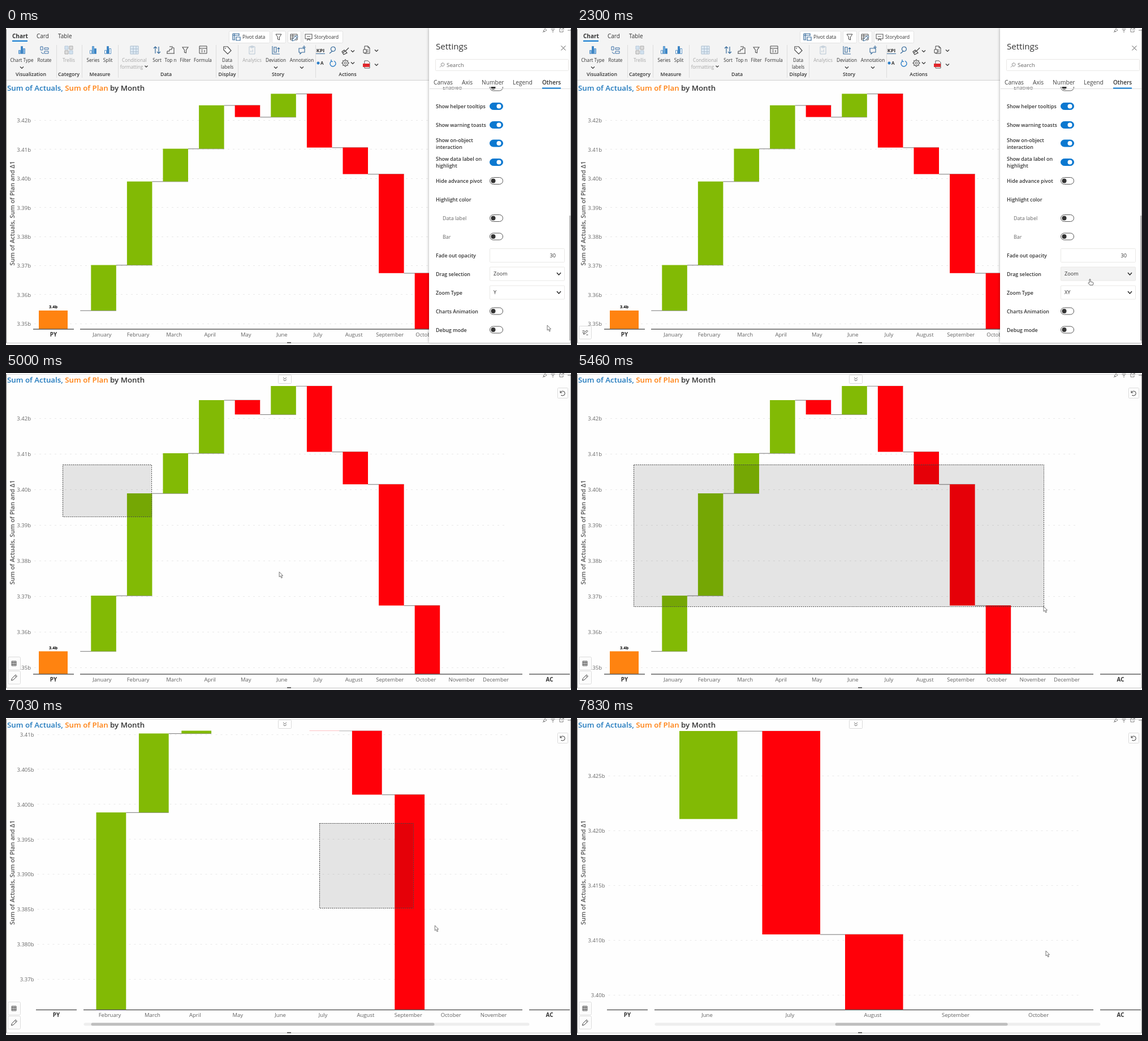
An HTML page with a canvas that plays this animation: 999x561 px, repeating every 8 s.

```html
<!DOCTYPE html>
<html lang="en">
<head>
<meta charset="utf-8">
<title>Chart zoom</title>
<style>
html, body { margin: 0; width: 100%; height: 100%; overflow: hidden; background: #fff }
canvas { display: block; width: 999px; height: 561px }
</style>
</head>
<body>
<canvas id="stage"></canvas>
<script>
const canvas = document.getElementById('stage'), c = canvas.getContext('2d');
const dpr = window.devicePixelRatio || 1;
canvas.width = 999 * dpr;
canvas.height = 561 * dpr;

const BLUE = '#0b78d0', INK = '#333', MUTED = '#666', LINE = '#e9e8e6';
const GREEN = '#82ba05', RED = '#ff0009', ORANGE = '#ff8310';
const MONTHS = ['January', 'February', 'March', 'April', 'May', 'June', 'July', 'August',
  'September', 'October', 'November', 'December'];
// Waterfall levels, in pixels of the unzoomed chart
const LEVELS = [492.5, 394, 213, 142, 48, 73.4, 23, 139.5, 197, 411.5, 560];

// top + scale * (level - 23) gives y; bars start at x0 with the given pitch
const VIEWS = {
  panel: { top: 116.4, scale: .817, base: 533, first: 0, last: 11, x0: 150.3, pitch: 63.6, label: 19.6,
    axis: 131, py: 48, titleY: 106, nameY: 328, tickY: 164, tickStep: 51.4, tickX: 44,
    ticks: ['3.42b', '3.41b', '3.40b', '3.39b', '3.38b', '3.37b', '3.36b', '3.35b'] },
  wide: { top: 23, scale: 1, base: 533, first: 0, last: 11, x0: 150.3, pitch: 63.6, label: 19.6,
    axis: 131, py: 48, titleY: 12, nameY: 282, tickY: 80.5, tickStep: 63, tickX: 44,
    ticks: ['3.42b', '3.41b', '3.40b', '3.39b', '3.38b', '3.37b', '3.36b', '3.35b'] },
  zoom1: { top: -206.8, scale: 1.968, base: 516.5, first: 1, last: 10, x0: 159.5, pitch: 75.4, label: 24,
    axis: 137, py: 53, titleY: 12, nameY: 273.5, tickY: 29.5, tickStep: 61.9, tickX: 49.5, thumb: [150, 758],
    ticks: ['3.41b', '3.405b', '3.400b', '3.395b', '3.390b', '3.385b', '3.380b', '3.37b'] },
  zoom2: { top: 23, scale: 3.09, base: 516.5, first: 5, last: 9, x0: 181, pitch: 146.5, label: 49,
    axis: 137, py: 53, titleY: 12, nameY: 273.5, tickY: 102.5, tickStep: 97, tickX: 49.5, thumb: [456, 762],
    ticks: ['3.425b', '3.420b', '3.415b', '3.410b', '3.40b'] }
};

// ---- drawing helpers ----
function text(s, x, y, size, color = INK, weight = 400, align = 'left') {
  c.font = `${weight} ${size}px "Open Sans", "Noto Sans", sans-serif`;
  c.fillStyle = color;
  c.textAlign = align;
  c.fillText(s, x, y + size * .357);
  return c.measureText(s).width;
}
const mid = (s, x, y, size, color, weight) => text(s, x, y, size, color, weight, 'center');

function rect(x, y, w, h, fill) {
  c.fillStyle = fill;
  c.fillRect(x, y, w, h);
}
function box(x, y, w, h, fill, stroke, r = 0) {
  c.beginPath();
  c.roundRect(x + .5, y + .5, w - 1, h - 1, r);
  if (fill) { c.fillStyle = fill; c.fill(); }
  if (stroke) { c.strokeStyle = stroke; c.lineWidth = 1; c.stroke(); }
}
function dot(x, y, r, fill) {
  c.beginPath();
  c.arc(x, y, r, 0, 7);
  c.fillStyle = fill;
  c.fill();
}
function icon(x, y, d, stroke = '#444', fill, width = 1) {
  const p = new Path2D(d);
  c.save();
  c.translate(x, y);
  c.lineWidth = width;
  if (fill) { c.fillStyle = fill; c.fill(p); }
  if (stroke) { c.strokeStyle = stroke; c.stroke(p); }
  c.restore();
}
const chevron = (x, y, s = 3) => icon(x, y, `M${-s} ${-s / 2}L0 ${s / 2}L${s} ${-s / 2}`, '#333', null, 1.2);
const FUNNEL = 'M-5-5H5L1.5 0V5L-1.5 4V0Z';
const LENS = 'M-1 2A4 4 0 1 1 4 0A4 4 0 0 1-1 2L-6 6';
const SMALL_LENS = 'M-1 1A2.8 2.8 0 1 1 1 2A2.8 2.8 0 0 1-1 1L-4 4';
const PENCIL = 'M-5 5L-4 1.5L2.5-5L5-2.5L-1.5 4ZM1-3.5L3.5-1';
const TABLE = 'M-6-5H6V5H-6ZM-6-2H6M-6 2H6M-2-5V5';
const LOOP = 'M-3-4A5 5 0 1 0 2-4.6M-3-7V-3.6H0';

// ---- chart ----
function chart(v) {
  const yOf = l => v.top + v.scale * (l - 23), w = v.pitch * .7;

  c.strokeStyle = '#e8e8e8';
  c.lineWidth = 1;
  c.setLineDash([3, 6]);
  v.ticks.forEach((s, i) => {
    const y = v.tickY + i * v.tickStep;
    c.beginPath();
    c.moveTo(v.tickX + 6, Math.round(y) - .5);
    c.lineTo(v.tickX + 842, Math.round(y) - .5);
    c.stroke();
    text(s, v.tickX, y, 9.5, MUTED, 400, 'right');
  });
  c.setLineDash([]);

  c.save();
  c.beginPath();
  c.rect(v.axis, 22.5, 913 - v.axis, v.base - 22.5);
  c.clip();
  for (let i = v.first; i <= Math.min(v.last, 9); i++) {
    const x = v.x0 + (i - v.first) * v.pitch, a = yOf(LEVELS[i]), b = yOf(LEVELS[i + 1]);
    if (i > v.first || !i) rect(x - v.pitch * .3, a - .3, v.pitch, 1, '#777');
    rect(x, Math.min(a, b), w, Math.abs(b - a), b < a ? GREEN : RED);
  }
  c.restore();

  if (!v.first) {
    const y = yOf(LEVELS[0]);
    rect(58, y, 51, v.base - y, ORANGE);
    mid('3.4b', 83.5, y - 6.5, 7.3, '#000', 700);
  }
  for (const [a, b] of [[v.py, v.py + 72], [v.axis, 913], [925, 997]]) rect(a, v.base - .7, b - a, 1.4, '#555');
  const ly = v.base + 9.5;
  for (let i = v.first; i <= v.last; i++)
    mid(MONTHS[i], Math.min(v.x0 + (i - v.first) * v.pitch + v.label, 866), ly, 9.5, '#606060');
  mid('PY', v.py + 36, ly, 9.8, INK, 700);
  mid('AC', 961, ly, 9.8, INK, 700);

  let x = 2;
  for (const [s, col] of [['Sum of Actuals, ', '#2079bd'], ['Sum of Plan ', '#ff7f0e'], ['by Month', INK]])
    x += text(s, x, v.titleY, 13.3, col, 600);
  c.save();
  c.translate(11, v.nameY);
  c.rotate(-Math.PI / 2);
  mid('Sum of Actuals, Sum of Plan and Δ1', 0, 0, 10.9, '#555', 600);
  c.restore();

  if (v.thumb) {
    box(137, 539, 789, 6, '#eee', null, 3);
    box(v.thumb[0], 539, v.thumb[1] - v.thumb[0], 6, '#bebebe', null, 3);
  }
}

// ---- ribbon ----
function bars(x, y, cols) {
  cols.forEach((col, i) => {
    const h = [7, 14, 10][i];
    box(x - 6 + i * 4, y + 7 - h, 4, h, col, '#5c93c4');
  });
}
function ribbon() {
  rect(1, 0, 748, 92, '#f4f4f4');
  rect(1, 92, 748, 1, '#d0d0d0');
  text('Chart', 11, 14, 10, INK, 700);
  text('Card', 54, 14, 10);
  text('Table', 92, 14, 10);
  rect(11, 22, 27, 2, BLUE);
  for (const [x, w] of [[394, 73], [470, 25], [498, 24], [525, 71]]) box(x, 5, w, 22, '#fff', '#e2e2e2', 2);
  text('Pivot data', 418, 16, 8.7);
  text('Storyboard', 545, 16, 8.3);
  icon(407, 16, 'M-6-6H5V-2M-6-6V5H-2M-6-3H5M-3-6V5M0 0H7V6H0Z', '#34699a', null, 1.2);
  icon(482, 16, FUNNEL);
  icon(509, 16, TABLE);
  icon(511, 18, PENCIL, '#34699a', '#fff');
  icon(535, 16, 'M-6-5H6V3H-6ZM-3 6L0 3L3 6M-3-1H3', '#555', null, 1.1);

  for (const x of [89, 134, 198, 371, 410, 547]) rect(x, 30, 1, 58, '#dcdcdc');
  const sections = { Visualization: 44, Category: 111, Measure: 166, Data: 283, Display: 391, Story: 481, Actions: 604 };
  for (const s in sections) mid(s, sections[s], 82, 8.8, INK, 600);
  const tools = { 'Chart Type': 28, Rotate: 68, Series: 154, Split: 180, Sort: 267, 'Top n': 291, Filter: 317,
    Formula: 348, Data: 391, Deviation: 477, Annotation: 523 };
  for (const s in tools) mid(s, tools[s], 57, 8.2);
  mid('labels', 391, 69, 8.2);
  for (const [s, x, y] of [['Trellis', 111, 57], ['Analytics', 435, 57], ['Conditional', 227, 57], ['formatting', 222, 69]])
    mid(s, x, y, 8.2, '#a5a5a5');
  for (const x of [28, 477, 523]) chevron(x, 70);
  chevron(248, 68, 2.5);

  bars(28, 39, ['#8cc0ec', '#2f80c8', '#8cc0ec']);
  icon(68, 39, 'M-7-6H-3V0H-7ZM0-4H7V-1H0ZM0 2H7V6H0ZM-6 3L-4 6H-1', '#3a6ea5');
  icon(111, 39, 'M-7-7H-1V-1H-7ZM1 1H7V7H1Z', '#b5c7d8', '#d2e2ef');
  icon(111, 39, 'M1-7H7V-1H1ZM-7 1H-1V7H-7Z', '#aaa', '#ddd');
  bars(154, 39, ['#fff', '#6bb0e6', '#2f80c8']);
  bars(180, 39, ['#fff', '#2f80c8', '#fff']);
  icon(227, 39, 'M-7-7H7V7H-7ZM-7-2H7M-7 3H7M-2-7V7M3-7V7', '#a9bccd', '#e1ecf6');
  icon(267, 39, 'M-3 6V-6M-6-3L-3-6L0-3M3-6V6M0 3L3 6L6 3', '#34699a', null, 1.2);
  icon(291, 39, 'M-7 6H7M-6 6V2H-2V-1H2V-4H6V6M-2-6H4', '#444');
  icon(317, 39, FUNNEL, '#555', null, 1.1);
  icon(348, 39, 'M-6-7H7V6H-6ZM-6-3H7M-3 0H0M3 0V4M-3 3H0', '#444');
  icon(391, 39, 'M-6-6H1L7 1L1 7L-6 0ZM-3-4V-2', '#444', '#fff', 1.2);
  icon(435, 39, 'M-5-6H5V7H-5ZM-2-7H2V-4H-2ZM-2 4V1M1 4V-1', '#b4c4d2');
  icon(477, 39, 'M-6-7V7H7M-3-5H1V4H-3ZM5-4V4M3-2L5-4L7-2', '#34699a', null, 1.1);
  icon(523, 39, 'M-5-3H5V4H0L-3 7V4H-5ZM4-8V-2M1-5H7', '#34699a', null, 1.1);
  mid('KPI', 556, 40, 8.8, INK, 700);
  rect(548, 45, 16, 1, '#34699a');
  icon(578, 39, LENS, '#34699a', null, 1.2);
  icon(600, 41, 'M6-6L0 0M-2-2L3 3L-3 6L-6 1ZM-4 3L-1 0', '#444', null, 1.2);
  dot(552, 62, 2.5, '#2f80c8');
  text('A', 556, 62, 8, INK, 700);
  icon(578, 63, LOOP, '#2f80c8', null, 1.4);
  dot(600, 62, 5.5, '#555');
  dot(600, 62, 4.3, '#f4f4f4');
  icon(600, 62, 'M-2 0A2 2 0 1 1 2 0A2 2 0 1 1-2 0M0-7V-5M0 7V5M-7 0H-5M7 0H5M-5-5L-4-4M5 5L4 4M-5 5L-4 4M5-5L4-4', '#555');
  icon(638, 39, 'M-4-7H2L5-4V6H-4ZM2-7V-4H5M-1 0H3M-1 3H3', '#444');
  icon(637, 40, 'M-5-2H0V4H-5Z', '#444', '#fff');
  icon(638, 65, 'M-4-7H2L5-4V6H-4Z', '#555', '#fff');
  rect(631, 63, 12, 6, '#e0262b');
  for (const [x, y] of [[613, 41], [655, 40], [613, 62], [655, 65]]) chevron(x, y);
}

// ---- settings panel ----
function toggle(y, on) {
  box(855, y - 6.5, 24, 13, on ? BLUE : '#fff', on ? BLUE : '#555', 6);
  dot(on ? 871.5 : 861.5, y, 4, on ? '#fff' : INK);
}
function select(y, value, fill = '#fff', stroke = LINE) {
  box(855, y - 12.5, 133, 25, fill, stroke, 1);
  text(value, 862, y, 9.1);
  icon(977.5, y, 'M-3.5-2L0 2L3.5-2', '#222', null, 1.4);
}
function panel(t) {
  const open = t >= 1200 && t < 2300;
  c.save();
  c.shadowColor = 'rgba(0,0,0,.35)';
  c.shadowBlur = 5;
  rect(748, 0, 251, 557, '#fff');
  c.restore();

  c.save();
  c.beginPath();
  c.rect(748, 104, 250, 12);
  c.clip();
  text('Enabled', 772, 106, 9, MUTED);
  toggle(105, false);
  c.restore();

  text('Settings', 760, 33, 15.1);
  icon(985.5, 35.5, 'M-4-4L4 4M4-4L-4 4', '#555');
  box(759, 55, 236, 21, '#fff', LINE, 1);
  icon(771, 65.5, SMALL_LENS, '#888');
  text('Search', 779, 65.5, 9.8, '#666');
  for (const [s, x] of [['Canvas', 756], ['Axis', 806], ['Number', 841], ['Legend', 896]]) text(s, x, 96, 10.2, '#444');
  text('Others', 948, 96, 10, INK, 600);
  rect(749, 107, 249, 1, '#dedede');
  rect(948, 105.5, 33, 2, BLUE);

  const rows = { 'Show helper tooltips': 139, 'Show warning toasts': 172, 'Show on-object': 198.5, interaction: 211,
    'Show data label on': 231.5, highlight: 244, 'Hide advance pivot': 271, 'Highlight color': 304,
    'Fade out opacity': 403, 'Drag selection': 435.5, 'Zoom Type': 468.5, 'Charts Animation': 502, 'Debug mode': 534.5 };
  for (const s in rows) text(s, 760, rows[s], 8.9, INK, 600);
  text('Data label', 772, 337, 9, MUTED);
  text('Bar', 772, 370, 9, MUTED);
  [138.5, 171.5, 204, 237.5].forEach(y => toggle(y, true));
  [270.5, 336.5, 369, 501, 534].forEach(y => toggle(y, false));
  box(855, 390, 133, 25, '#fff', LINE, 1);
  text('30', 972, 403, 9.1, INK, 400, 'right');
  select(435, 'Zoom', t >= 2300 && t < 2800 ? '#f3f3f3' : '#fff');
  select(468, t < 2300 ? 'Y' : 'XY', '#fff', open ? '#888' : LINE);
  rect(996, 332, 2, 221, '#b5b5b5');

  if (open) {
    c.save();
    c.shadowColor = 'rgba(0,0,0,.25)';
    c.shadowBlur = 5;
    c.shadowOffsetY = 1;
    rect(855, 358, 133, 97, '#fff');
    c.restore();
    rect(855, 390.5, 133, 32, '#edebe9');
    if (t > 1690) rect(855, 422.5, 133, 32, '#f3f2f1');
    ['X', 'Y', 'XY'].forEach((s, i) => text(s, 862, 374 + 32 * i, 9.1));
  }
}

// ---- frame and floating buttons ----
function chrome() {
  rect(0, 2, 1, 556, '#777');
  rect(998, 2, 1, 556, '#999');
  rect(0, 557, 999, 1, '#c4c4c4');
  rect(497, 556, 7, 2, '#666');
  icon(953, 4, 'M0-3L3 0L1 1L-1 3L-3 1L-1-1ZM-1 1L-4 4', '#777', null, .9);
  icon(967, 4, 'M-3.5-2H3.5M-2 .5H2M-1 3H1', '#777');
  icon(982, 4, 'M0-3H-3V3H3V0M0 0L4-4M1-4H4V-1', '#777', null, .9);
  for (let i = 0; i < 3; i++) dot(994 + i * 2, 4, .7, '#555');
}
function buttons(t) {
  const full = t >= 3900;
  if (t < 1200) return;
  box(3, 527, 23, 24, t >= 3600 && t < 4360 ? '#e0e0e0' : '#fcfcfc', '#dcdcdc', 2);
  if (!full) {
    icon(14.5, 539, 'M-3 3L-2 0L3-4L4.5-2.5L0 2ZM-5-3H-1M-5 0H-3M2 4H5', '#444');
    return;
  }
  icon(14.5, 539, PENCIL, '#444');
  box(3, 502, 23, 24, '#fcfcfc', '#dcdcdc', 2);
  icon(14, 514, 'M-4-4H4V4H-4ZM-4-1.5H4M-4 1.5H4M-1.5-4V4M1.5-4V4', '#444', null, .9);
  box(481, 3, 24, 16, '#fff', '#dadada', 1);
  icon(493, 11, 'M-3-3L0-.5L3-3M-3 .5L0 3L3 .5', '#666');
  box(975, 26, 19, 19, '#fff', '#dadada', 1);
  icon(984.5, 36, 'M-4-1.5A4 4 0 1 1-3 3M-4.5-4.5V-1H-1', '#555', null, 1.1);
}

// ---- pointer ----
const ease = s => (s = Math.min(1, Math.max(0, s)), s * s * (3 - 2 * s));
const MOVES = [ // start, end, x, y
  [0, 1, 957, 526], [500, 1000, 907, 466], [1600, 1760, 907, 444], [2700, 3230, 475, 535], [3370, 3660, 15, 534],
  [4270, 4700, 100, 162], [5690, 5860, 811, 406], [6370, 6650, 554, 186]
];
const DRAGS = [
  { start: 4700, span: 580, lag: 127, clear: 5700, from: [100, 162], to: [825, 413], bend: 1.88 },
  { start: 6650, span: 570, lag: 57, clear: 7670, from: [554, 186], to: [829, 412], bend: 1.19 }
];
function dragPoint(d, t) {
  const u = ease((t - d.start) / d.span), w = 1 - (1 - u) ** d.bend;
  return [d.from[0] + (d.to[0] - d.from[0]) * u, d.from[1] + (d.to[1] - d.from[1]) * w];
}
function pointerAt(t) {
  let p = [957, 526];
  for (const [a, b, x, y] of MOVES) {
    if (t < a) break;
    if (a === 5690) p = DRAGS[0].to;
    const u = ease((t - a) / (b - a));
    p = [p[0] + (x - p[0]) * u, p[1] + (y - p[1]) * u];
  }
  const d = DRAGS.find(g => t >= g.start && t < (g === DRAGS[0] ? 5690 : 8000));
  return d ? dragPoint(d, t) : p;
}
function pointer(t) {
  const [x, y] = pointerAt(t);
  const hand = t > 850 && t < 2780 || t > 3610 && t < 4340;
  if (hand) icon(x, y, 'M-1 1Q0-.5 1 1V5L5 6Q6 6 6 8L5 11H0L-3 7.5Q-3 6-1 7Z', '#555', '#fff', .9);
  else icon(x, y, 'M0 0V9L2.2 7.2L3.8 11L5.4 10.2L3.8 6.8H6.5Z', '#666', '#fff', .9);
}
function selection(t) {
  const d = DRAGS.find(g => t > g.start + g.lag && t < g.clear);
  if (!d) return;
  const [x, y] = d.from, [x2, y2] = dragPoint(d, t - d.lag);
  rect(x, y, x2 - x, y2 - y, 'rgba(0,0,0,.1)');
  c.strokeStyle = '#444';
  c.lineWidth = 1;
  c.setLineDash([2, 1.5]);
  c.strokeRect(x + .5, y + .5, Math.round(x2 - x), Math.round(y2 - y));
  c.setLineDash([]);
}

function draw(t) {
  c.setTransform(dpr, 0, 0, dpr, 0, 0);
  rect(0, 0, 999, 561, '#fefefe');
  const settings = t < 3900;
  chart(settings ? VIEWS.panel : t < 5700 ? VIEWS.wide : t < 7670 ? VIEWS.zoom1 : VIEWS.zoom2);
  if (settings) {
    ribbon();
    panel(t);
  } else rect(0, 2, 999, 1, '#d8d8d8');
  chrome();
  buttons(t);
  selection(t);
  pointer(t);
}
const begin = performance.now();
function tick() {
  draw((performance.now() - begin) % 8000);
  requestAnimationFrame(tick);
}
tick();
</script>
</body>
</html>
```
